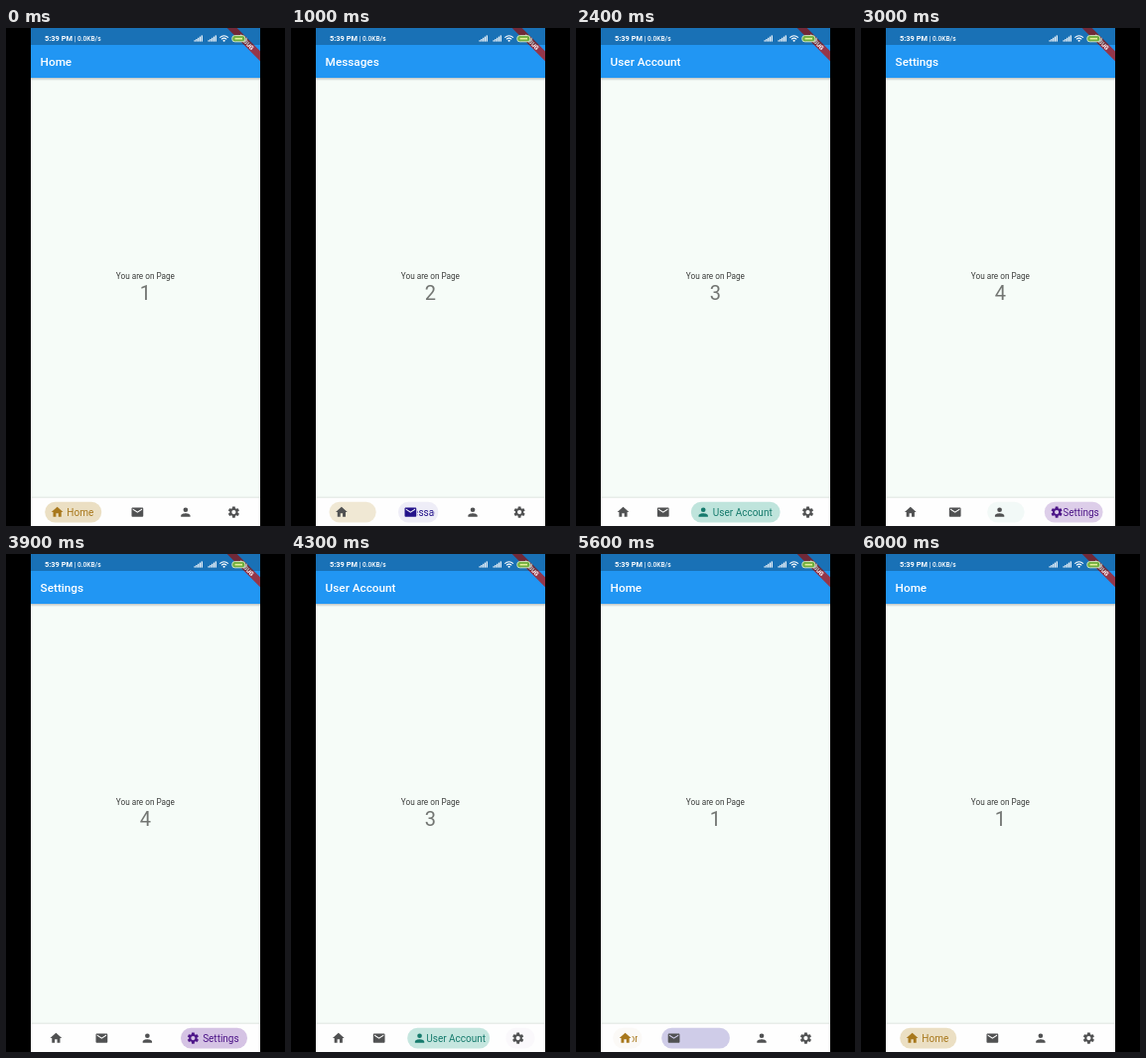
These frames come from a looping animation (281 by 500 pixels, 6100 ms). An HTML page:

```html
<!DOCTYPE html>
<html lang="en">
<head>
<meta charset="utf-8">
<title>Bottom navigation</title>
<style>
  html, body { margin: 0; width: 100%; height: 100%; overflow: hidden; background: #000; }
  svg { display: block; }
  text { font-family: Roboto, "Noto Sans", sans-serif; }
</style>
</head>
<body>
<svg id="stage" width="281" height="500" viewBox="0 0 281 500">
  <defs>
    <linearGradient id="shade" x2="0" y2="1">
      <stop offset="0" stop-color="#000" stop-opacity=".22"/>
      <stop offset="1" stop-color="#000" stop-opacity="0"/>
    </linearGradient>
    <clipPath id="screen"><rect x="25" width="231" height="500"/></clipPath>
  </defs>
  <rect width="281" height="500" fill="#000"/>
  <g clip-path="url(#screen)">
    <rect x="25" width="231" height="500" fill="#f6fcf8"/>
    <rect x="25" y="50" width="231" height="3" fill="url(#shade)"/>
    <rect x="25" width="231" height="50" fill="#2196f3"/>
    <text id="title" x="34.6" y="38.2" font-size="11.76" font-weight="500" fill="#fff"></text>

    <text x="140.4" y="252.2" font-size="8.2" text-anchor="middle" fill="#3c3e3c">You are on Page</text>
    <text id="page" x="140.4" y="273.2" font-size="20" text-anchor="middle" fill="#727572"></text>

    <rect x="25" y="470.5" width="231" height="1.5" fill="#000" opacity=".06"/>
    <rect x="25" y="472" width="231" height="28" fill="#fefefe"/>
    <g id="bar"></g>

    <g transform="translate(256 0) rotate(45)">
      <rect x="-24" y="16.5" width="48" height="7.05" fill="#b71c1c" opacity=".78"/>
      <text y="22.2" font-size="6" font-weight="900" text-anchor="middle" fill="#fff">DEBUG</text>
    </g>
    <rect x="25" width="231" height="17" fill="#000" opacity=".25"/>

    <g fill="#fff">
      <text x="39" y="13.3" font-size="7.4" font-weight="700">5:39 PM</text>
      <text x="68.6" y="13.3" font-size="6.6" font-weight="500">| 0.0KB/s</text>
      <g id="signals"></g>
    </g>
    <g fill="none" stroke="#fff" stroke-width="1.1">
      <path d="M215.3 9.6Q219.6 5.8 223.9 9.6M217 11.3Q219.6 9 222.2 11.3"/>
      <circle cx="219.6" cy="12.8" r=".5"/>
    </g>
    <rect x="227.8" y="7.6" width="13" height="6.2" rx="2.6" fill="#6fae3c" stroke="#dcebd0" stroke-width=".9"/>
    <rect x="241.6" y="9.4" width="1" height="2.6" rx=".5" fill="#dcebd0"/>
    <path d="M230.5 10.7h7.5" stroke="#e6ef9a" stroke-width="1.6"/>
  </g>
</svg>
<script>
const NS = "http://www.w3.org/2000/svg";
const LOOP = 6100, STEP = 100, DURATION = 500;
const PAD = 5.35, ICON = 14.1, GAP = 2.7, TAIL = 7.9, MID = 486.1, HEIGHT = 20.6;
const BAR_LEFT = 27.35, BAR_WIDTH = 226.3, ALIGN = 0.4;

function gear() {
  const points = [];
  for (let k = 0; k < 6; k++) {
    for (const [r, turn] of [[6.9, -23], [9.9, -13], [9.9, 13], [6.9, 23]]) {
      const a = (k * 60 - 90 + turn) * Math.PI / 180;
      points.push((12 + r * Math.cos(a)).toFixed(2) + " " + (12 + r * Math.sin(a)).toFixed(2));
    }
  }
  return "M" + points.join("L") + "ZM8.4 12a3.6 3.6 0 1 0 7.2 0a3.6 3.6 0 1 0-7.2 0z";
}

const tabs = [
  { label: "Home", width: 27, ink: "#a8781c", fill: "#ebdfc3",
    icon: "M10 20v-6h4v6h5v-8h3L12 3 2 12h3v8z" },
  { label: "Messages", width: 46, ink: "#23128a", fill: "#c7c4e5",
    icon: "M20 4H4c-1.1 0-2 .9-2 2v12c0 1.1.9 2 2 2h16c1.1 0 2-.9 2-2V6c0-1.1-.9-2-2-2zm0 4l-8 5-8-5V6l8 5 8-5z" },
  { label: "User Account", width: 60, ink: "#157a6c", fill: "#bfe4dc",
    icon: "M12 12a4 4 0 1 0 0-8a4 4 0 0 0 0 8zm0 2c-2.67 0-8 1.34-8 4v2h16v-2c0-2.66-5.33-4-8-4z" },
  { label: "Settings", width: 37, ink: "#4d1588", fill: "#d5c3e4", icon: gear() }
];

// lead: how far the transition has already run when the page flips
const taps = [
  { at: 1000, to: 1, lead: 35 },
  { at: 2100, to: 2, lead: 40 },
  { at: 2900, to: 3, lead: 40 },
  { at: 4200, to: 2, lead: 80 },
  { at: 4900, to: 1, lead: 115 },
  { at: 5600, to: 0, lead: 15 }
];

const byId = id => document.getElementById(id);

function set(node, attrs) {
  for (const key in attrs) node.setAttribute(key, attrs[key]);
  return node;
}

function add(parent, tag, attrs) {
  return parent.appendChild(set(document.createElementNS(NS, tag), attrs));
}

for (const x of [189.5, 203.5]) {
  for (let i = 0; i < 5; i++) {
    const h = 1.4 + i * 1.2;
    add(byId("signals"), "rect", { x: x + i * 1.8, y: 13.6 - h, width: 1.2, height: h });
  }
}

for (const tab of tabs) {
  const bar = byId("bar");
  tab.pill = add(bar, "rect", { y: MID - HEIGHT / 2, height: HEIGHT, rx: HEIGHT / 2, fill: tab.fill });
  tab.glyph = add(bar, "path", { d: tab.icon, "fill-rule": "evenodd" });
  tab.clip = add(bar, "svg", { y: MID - 8, height: 16, overflow: "hidden" });
  tab.text = add(tab.clip, "text", { y: 11.5, "font-size": 10, fill: tab.ink });
  tab.text.textContent = tab.label;
}

const easeOut = x => 1 - Math.pow(1 - Math.min(1, Math.max(0, x)), 5);

function draw(time) {
  let now = 0, before = 0, k = 1;
  for (const tap of taps) {
    if (time < tap.at) break;
    before = now;
    now = tap.to;
    k = easeOut((time - tap.at + tap.lead) / DURATION);
  }
  byId("title").textContent = tabs[now].label;
  byId("page").textContent = now + 1;

  const open = tabs.map((_, i) => i === now ? k : i === before ? 1 - k : 0);
  const labels = tabs.map(tab => GAP + tab.width + TAIL);
  const widths = open.map((t, i) => PAD + ICON + PAD * (1 - t) + labels[i] * t);
  const space = (BAR_WIDTH - widths.reduce((a, b) => a + b)) / tabs.length;

  let x = BAR_LEFT + space / 2;
  tabs.forEach((tab, i) => {
    const t = open[i], room = labels[i] * t, active = i === now;
    set(tab.pill, { x, width: widths[i], opacity: t });
    set(tab.glyph, {
      transform: `translate(${x + PAD} ${MID - ICON / 2}) scale(${ICON / 24})`,
      fill: active ? tab.ink : "#505152"
    });
    set(tab.clip, { x: x + PAD + ICON, width: room, visibility: active ? "visible" : "hidden" });
    set(tab.text, { x: (room - labels[i]) * ALIGN + GAP });
    x += widths[i] + space;
  });
}

const start = performance.now();
function tick() {
  const time = (performance.now() - start) % LOOP;
  draw(Math.floor(time / STEP) * STEP);
  requestAnimationFrame(tick);
}
tick();
</script>
</body>
</html>
```
